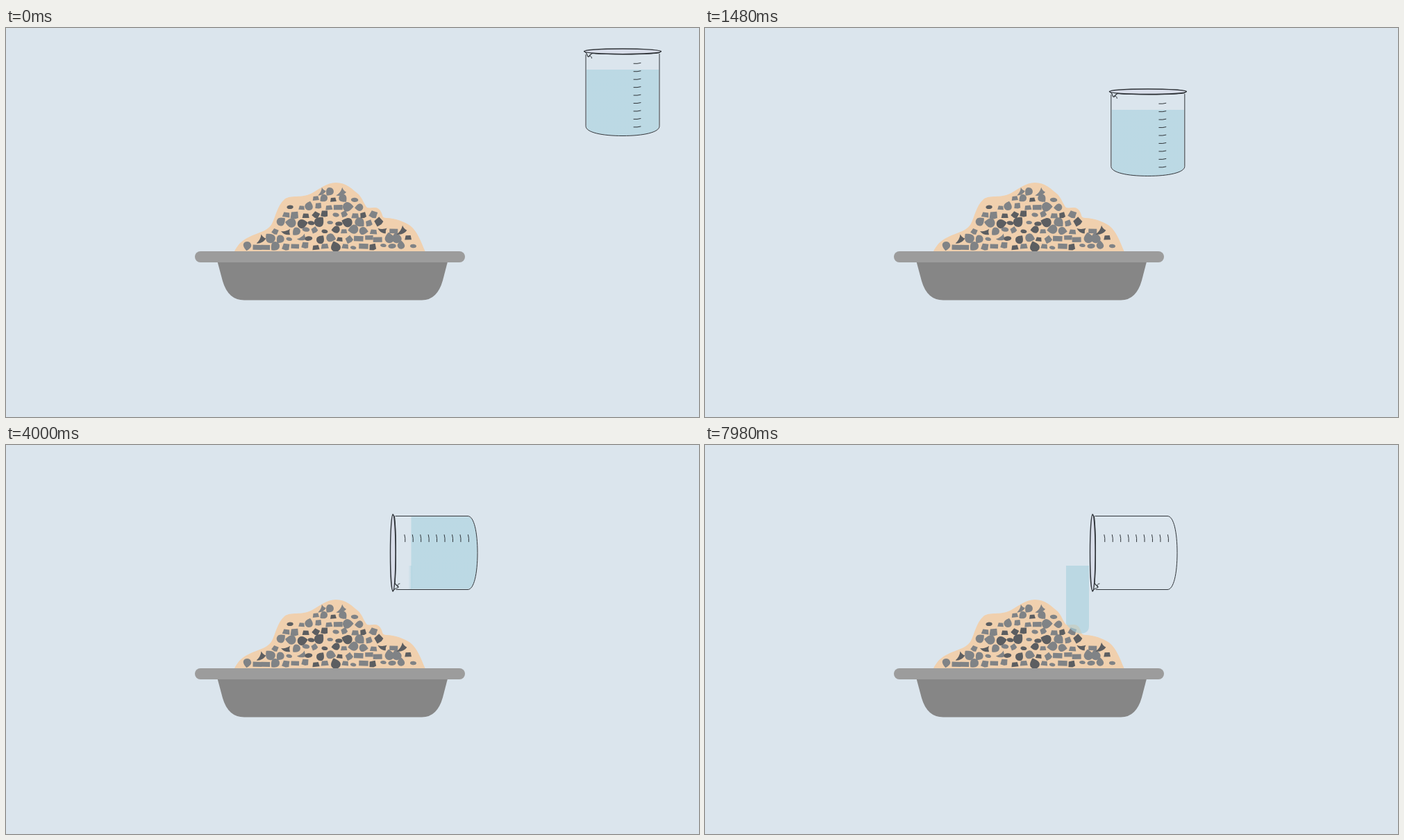
Write an HTML page with a canvas that moves like this. It is 998 by 561 pixels and loops after 8 s.

```html
<!DOCTYPE html>
<html lang="en">
<head>
<meta charset="utf-8">
<title>Pouring water onto gravel</title>
<style>
  html, body { margin: 0; width: 100%; height: 100%; overflow: hidden; background: #dbe5ed; }
  canvas { display: block; width: 100vw; height: 100vh; }
</style>
</head>
<body>
<canvas id="stage" width="998" height="561"></canvas>
<script>
const ctx = document.getElementById('stage').getContext('2d');
const LOOP = 8000;
const WATER = 'rgba(167,209,222,0.6)';
const CLEAR = 'rgba(167,209,222,0)';
const INK = '#30353a';

const clamp = v => Math.min(1, Math.max(0, v));
const progress = (t, start, length) => clamp((t - start) / length);
const smoother = u => u * u * u * (10 + u * (6 * u - 15));

const sand = new Path2D('M328.5 323C334 312 340 306 350 301.5C362 295 375 294 382 284' +
  'C388 274 390 257 401 247C410 240 425 246 440 238.5C452 232 462 223 475 223' +
  'C490 223 498 232 508 240C514 247 516 255 520 259C526 261 535 255 540 265' +
  'C543 270 541 274 548 274C560 274 573 279 582 285C593 294 597 307 604 323Z');

// Stone outlines one unit wide, with the range of their turn in radians
const stoneKinds = [
  { path: 'M-.5 .1C-.52 -.28 -.22 -.52 .08 -.46C.4 -.42 .5 -.08 .5 .4C.24 .46 -.44 .6 -.5 .1Z', size: 12.5, turn: 3 },
  { path: 'M-.42 -.4L.4 -.5L.5 .3L.1 .46L-.5 .4Z', size: 10, turn: 0.7 },
  { path: 'M-.5 .22C-.2 .12 .05 -.08 .22 -.42Q.26 -.08 .5 .1C.2 .34 -.18 .38 -.5 .22Z', size: 15, turn: 0.8 },
  { path: 'M-.5 0C-.5 -.4 .5 -.4 .5 0C.5 .4 -.5 .4 -.5 0Z', size: 10, turn: 0.2 },
  { path: 'M-.5 -.28H.5V.28H-.5Z', size: 13, turn: 0.05 },
  { path: 'M-.35 -.32H.38L.5 .32H-.5Z', size: 10, turn: 0.15 }
].map(kind => ({ ...kind, path: new Path2D(kind.path) }));

function seededRandom(seed) {
  return () => (seed = (seed * 16807) % 2147483647) / 2147483647;
}

// Jittered rows of stones, kept where they fit inside the sand
function scatterStones() {
  const random = seededRandom(4711);
  const spread = range => (random() * 2 - 1) * range;
  const inSand = (x, y) => ctx.isPointInPath(sand, x, y);
  const found = [];
  for (let row = 0; row < 8; row++) {
    for (let col = 0; col < 20; col++) {
      const x = 333 + (col + (row % 2) / 2) * 14 + spread(2.5);
      const y = 315 - row * 11.4 + spread(1.8);
      // Squaring favours the round pebbles at the head of the list
      const kind = stoneKinds[Math.floor(random() ** 1.5 * stoneKinds.length)];
      const size = kind.size * (1 + spread(0.15));
      const angle = spread(kind.turn);
      const color = random() < 0.2 ? '#5c5e61' : '#808386';
      const fits = inSand(x - 6, y) && inSand(x + 6, y) && inSand(x, y - 6);
      if (fits) found.push({ x, y, kind, size, angle, color });
    }
  }
  return found;
}
const stones = scatterStones();

function fillPath(d, color) {
  ctx.fillStyle = color;
  ctx.fill(new Path2D(d));
}

function strokePath(d, width) {
  ctx.lineWidth = width;
  ctx.stroke(new Path2D(d));
}

function drawStone({ x, y, kind, size, angle, color }) {
  ctx.save();
  ctx.translate(x, y);
  ctx.rotate(angle);
  ctx.scale(size, size);
  ctx.fillStyle = color;
  ctx.fill(kind.path);
  ctx.restore();
}

function drawTray() {
  ctx.fillStyle = '#f0d0ae';
  ctx.fill(sand);
  stones.forEach(drawStone);
  fillPath('M304.5 337H636L629 364Q621 392.5 599 392.5H343Q320 392.5 312 365Z', '#868686');
  ctx.fillStyle = '#9c9c9c';
  ctx.beginPath();
  ctx.roundRect(272, 322, 389, 16, 8);
  ctx.fill();
}

// Water fill that fades out along one axis between two positions
function fade(horizontal, solid, gone) {
  const g = horizontal
    ? ctx.createLinearGradient(solid, 0, gone, 0)
    : ctx.createLinearGradient(0, solid, 0, gone);
  g.addColorStop(0, WATER);
  g.addColorStop(1, CLEAR);
  return g;
}

function drawStream(t, drainX) {
  const arm = progress(t, 3960, 500);
  const fall = progress(t, 4460, 500);
  if (arm === 0) return;

  const armX = 585 - 71 * arm;
  const draining = drainX < 600;
  fillPath('M553 174H584.5V208H553Z',
    draining ? fade(true, drainX - 3, drainX + 3) : fade(true, armX + 6, armX));

  ctx.save();
  ctx.beginPath();
  ctx.rect(armX, 174, Math.max(0, 553 - armX), 34 + 64 * fall);
  ctx.clip();
  fillPath('M520 174H553V261Q553 272 540 272Q528 270 520 258Z', WATER);
  ctx.restore();
}

function drawBeaker(x, y, angle, drainX) {
  ctx.save();
  ctx.translate(x, y);
  ctx.rotate(angle);

  const level = drainX - x;
  fillPath('M-52 -32.5H52V49C52 58 30 62.5 0 62.5C-30 62.5 -52 58 -52 49Z',
    fade(false, level - 3, level + 3));

  ctx.strokeStyle = INK;
  ctx.lineCap = 'round';
  strokePath('M-53 -54V49C-53 58 -30 63 0 63C30 63 53 58 53 49V-55', 1);
  for (let i = 0; i < 9; i++) {
    const mark = -41.5 + i * 11.45;
    strokePath(`M16 ${mark + 0.3}Q21 ${mark + 0.8} 26 ${mark - 0.6}`, 1);
  }

  // Rim with its pouring lip on the left
  ctx.fillStyle = 'rgba(216,216,232,0.55)';
  ctx.beginPath();
  ctx.ellipse(0, -58.7, 55.3, 3.8, 0, 0, Math.PI * 2);
  ctx.fill();
  ctx.lineWidth = 1.4;
  ctx.stroke();
  strokePath('M-55.5 -59C-52 -57 -51 -55 -50.5 -52Q-49.5 -50 -47.5 -53L-44 -56' +
    'C-20 -54 30 -54 52 -56.5L55.5 -59', 1.2);
  strokePath('M-49 -51Q-45 -54 -44.5 -49', 1);
  ctx.restore();
}

function draw(t) {
  ctx.fillStyle = '#dbe5ed';
  ctx.fillRect(0, 0, 998, 561);

  const slide = smoother(progress(t, 50, 1850));
  const tilt = progress(t, 1950, 1950);
  const settle = progress(t, 4240, 220);
  // Everything right of this line has drained; it starts far off stage
  const drainX = t < 7080 ? 2000 : 684 - (t - 7080) * 0.149;

  drawTray();
  drawStream(t, drainX);
  drawBeaker(888 - 272 * slide + settle, 92.5 + 63 * slide, -tilt * Math.PI / 2, drainX);
}

const begin = performance.now();
function tick() {
  draw((performance.now() - begin) % LOOP);
  requestAnimationFrame(tick);
}
tick();
</script>
</body>
</html>
```
